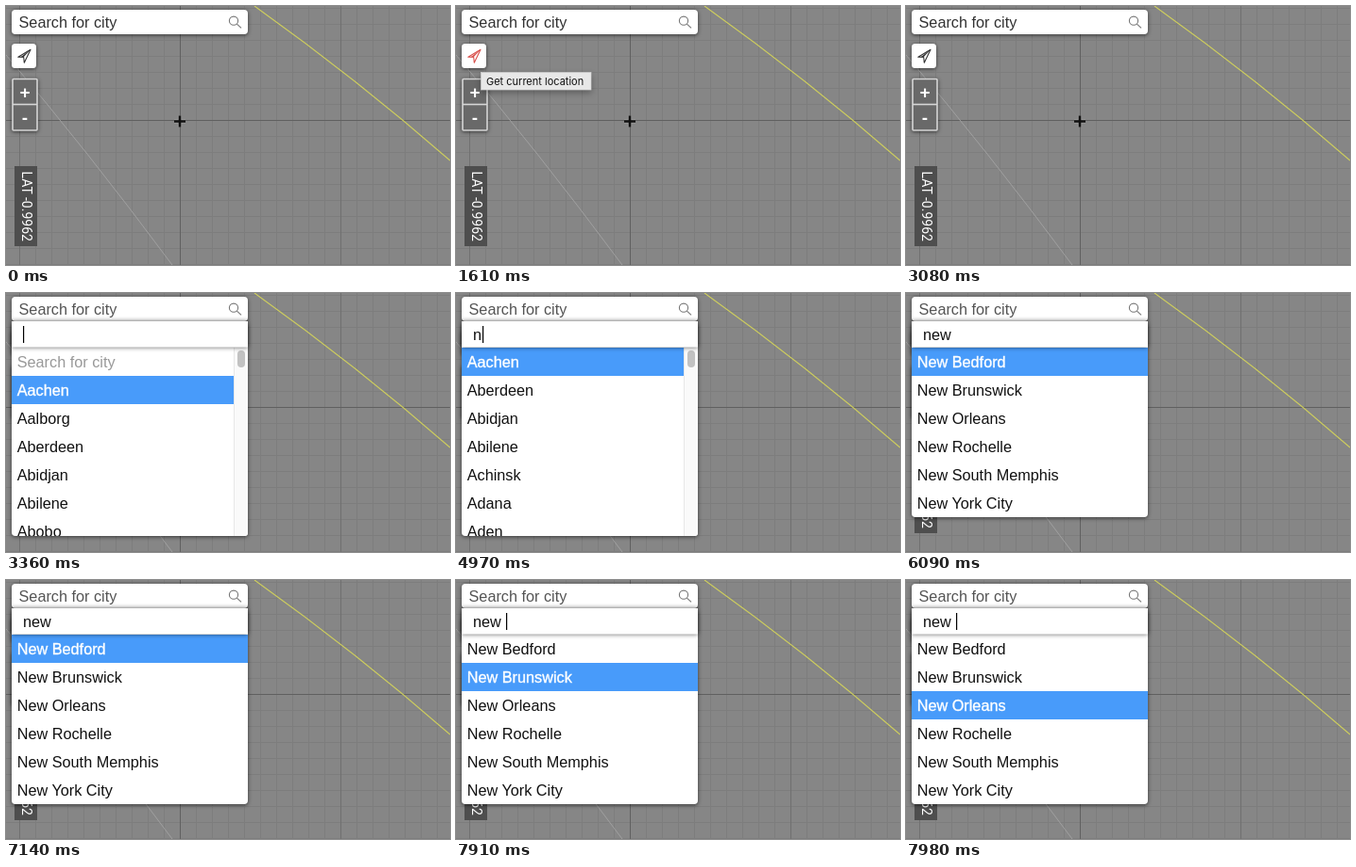
Animation of 470x275 px, one loop 8 s. Source, as an HTML page:

```html
<!DOCTYPE html>
<html lang="en">
<head>
<meta charset="utf-8">
<title>City search on a map</title>
<style>
  html, body { margin: 0; width: 100%; height: 100%; overflow: hidden; background: #868686; }
  svg { display: block; width: 470px; height: 275px; }
  text { font: 16.25px "Liberation Sans", Arial, sans-serif; white-space: pre; }
  .minor { stroke: #7d7d7d; }
  .major { stroke: #707070; }
  .axis { stroke: #606060; }
  .soft { filter: drop-shadow(0 1px 2px rgba(0, 0, 0, .6)); }
  .glow { filter: drop-shadow(0 0 2.5px rgba(0, 0, 0, .65)); }
  .tip { filter: drop-shadow(0 3px 3px rgba(0, 0, 0, .3)); }
  .tip text { font: 11px Inter, sans-serif; }
  .lat { font: 14px Roboto, sans-serif; }
  .zoom { font-weight: bold; font-size: 19px; text-anchor: middle; }
  .picked { fill: #fff; stroke: #fff; stroke-width: .35px; }
</style>
</head>
<body>
<svg viewBox="0 0 470 275">
  <defs><clipPath id="panelClip"><rect id="clipBox" x="6" y="56" width="250" height="202" rx="3"/></clipPath></defs>
  <rect width="470" height="275" fill="#868686"/>
  <g id="grid"></g>
  <path d="M0 52Q85 152 176 275" fill="none" stroke="#a3a3a3" stroke-width=".9"/>
  <path d="M263 0Q372 78 470 164" fill="none" stroke="#cfcf5c" stroke-width="1.1"/>
  <path d="M178 122.5h12M184 116.5v12" stroke="#b0b0b0" stroke-width="4.5" opacity=".5"/>
  <path d="M178 122.5h12M184 116.5v12" stroke="#111" stroke-width="2.6"/>

  <rect x="9" y="170" width="24" height="85" fill="#4e4e4e"/>
  <text class="lat" transform="translate(16.5 175.5) rotate(90)" fill="#fff">LAT -0.9962</text>

  <g class="soft">
    <rect x="7" y="77.5" width="26" height="54.5" rx="1" fill="#696969" stroke="#d6d6d6" stroke-width="1.6"/>
    <path d="M7 104.5h26" stroke="#d6d6d6" stroke-width="1.6"/>
  </g>
  <text class="zoom" x="20" y="97.5" fill="#fff">+</text>
  <text class="zoom" x="20" y="124.5" fill="#fff">-</text>

  <rect class="soft" x="6" y="40" width="26" height="26" rx="3.5" fill="#fff"/>
  <g id="arrow" stroke-width="1.1" stroke-linejoin="round">
    <path d="M26 46.2L12.8 54.3H18.7L19.3 60.2Z" fill="none"/>
    <path d="M26 46.2L15.5 54.3H18.7Z" stroke="none"/>
  </g>

  <g id="tip" class="tip">
    <rect x="26.5" y="70.5" width="116.5" height="18.5" fill="#e8e8e8" stroke="#d2d2d2" stroke-width=".7"/>
    <text x="32" y="83.5" fill="#111">Get current location</text>
  </g>

  <rect class="soft" x="6" y="4" width="250" height="26" rx="4" fill="#fff"/>
  <text id="label" x="13.5" y="23">Search for city</text>
  <g fill="none" stroke="#777" stroke-width="1.1">
    <circle cx="241" cy="15.7" r="4.6"/><path d="M244.4 19.1L249 23.3"/>
  </g>

  <g id="panel">
    <rect id="sheet" class="soft" x="6" y="32" width="250" height="226" rx="4" fill="#fff"/>
    <g clip-path="url(#panelClip)">
      <rect id="highlight" x="6" height="30" fill="#489bfa"/>
      <g id="rows"></g>
      <g id="scroll">
        <rect x="241" y="58" width="15" height="200" fill="#fafafa"/>
        <path d="M241.5 58v200" stroke="#e8e8e8"/>
        <rect id="thumb" x="245" y="61" width="8" rx="4" fill="#c2c2c2"/>
      </g>
    </g>
    <rect class="glow" x="6" y="30" width="250" height="27.5" fill="#fff"/>
    <text id="typed" x="18" y="50" fill="#111"></text>
    <rect id="caret" y="35" width="1.2" height="18" fill="#000"/>
  </g>
</svg>
<script>
const LOOP = 8000, ROW = 30, LIST_TOP = 58;
const $ = id => document.getElementById(id);
const set = (id, attrs) => {
  for (const name in attrs) $(id).setAttribute(name, attrs[name]);
};
const show = (id, on) => set(id, { visibility: on ? "inherit" : "hidden" });

const newCities = ["New Bedford", "New Brunswick", "New Orleans", "New Rochelle", "New South Memphis", "New York City"];
const searches = [
  { at: 3360, text: "", caret: 18, pick: 1, thumb: 18,
    list: ["Search for city", "Aachen", "Aalborg", "Aberdeen", "Abidjan", "Abilene", "Abobo"] },
  { at: 4970, text: "n", caret: 28, pick: 0, thumb: 18,
    list: ["Aachen", "Aberdeen", "Abidjan", "Abilene", "Achinsk", "Adana", "Aden"] },
  { at: 5180, text: "ne", caret: 37, pick: 0, thumb: 18,
    list: ["Abilene", "Annecy", "Banes", "Bayonne", "Boulogne-sur-Mer", "Bournemouth", "Brisbane"] },
  { at: 5320, text: "new", caret: 49, pick: 0, thumb: 89, list: ["Kennewick", ...newCities] },
  { at: 5530, text: "new ", caret: 53, pick: 0, thumb: 0, list: newCities }
];
const caretGaps = [[3850, 4410], [6090, 6650], [7140, 7700]];
const within = (t, [start, end]) => t >= start && t < end;

function buildGrid() {
  let lines = "";
  const add = (step, path) => {
    const kind = step === 0 ? "axis" : step % 10 === 0 ? "major" : "minor";
    const line = `<path class="${kind}" d="${path}"/>`;
    lines = kind === "minor" ? line + lines : lines + line;
  };
  for (let i = -10; i <= 16; i++) add(i, `M${184.5 + 17 * i} 0V275`);
  for (let i = -7; i <= 9; i++) add(i, `M0 ${121.5 + 17 * i}H470`);
  $("grid").innerHTML = lines;
}

let shown = "";
function drawRows(search, pick) {
  const key = search.at + ":" + pick;
  if (key === shown) return;
  shown = key;
  $("rows").innerHTML = search.list.map((city, i) => {
    const look = i === pick ? 'class="picked"' : `fill="${city === "Search for city" ? "#999" : "#111"}"`;
    return `<text x="11.7" y="${79 + ROW * i}" ${look}>${city}</text>`;
  }).join("");
}

function drawPanel(t, search) {
  const steps = search.text === "new " ? (t >= 7910) + (t >= 7980) : 0;
  const pick = search.pick + steps;
  const bottom = Math.min(258, LIST_TOP + ROW * search.list.length);
  drawRows(search, pick);
  set("sheet", { height: bottom - 32 });
  set("clipBox", { height: bottom - 56 });
  set("highlight", { y: LIST_TOP + ROW * pick, width: search.thumb ? 235 : 250 });
  set("thumb", { height: search.thumb });
  set("caret", { x: search.caret });
  show("scroll", search.thumb > 0);
  show("caret", !caretGaps.some(gap => within(t, gap)));
  $("typed").textContent = search.text;
}

function draw(t) {
  const hover = within(t, [70, 2520]);
  set("arrow", { fill: hover ? "#d9524e" : "#333", stroke: hover ? "#d9524e" : "#333" });
  show("tip", within(t, [1610, 2870]));
  set("tip", { opacity: t < 2800 ? 1 : 0.45 });

  const search = searches.findLast(s => t >= s.at);
  show("panel", Boolean(search));
  set("label", { fill: search ? "#555" : "#333" });
  if (search) drawPanel(t, search);
}

buildGrid();
const start = performance.now();
function tick() {
  draw((performance.now() - start) % LOOP);
  requestAnimationFrame(tick);
}
tick();
</script>
</body>
</html>
```
